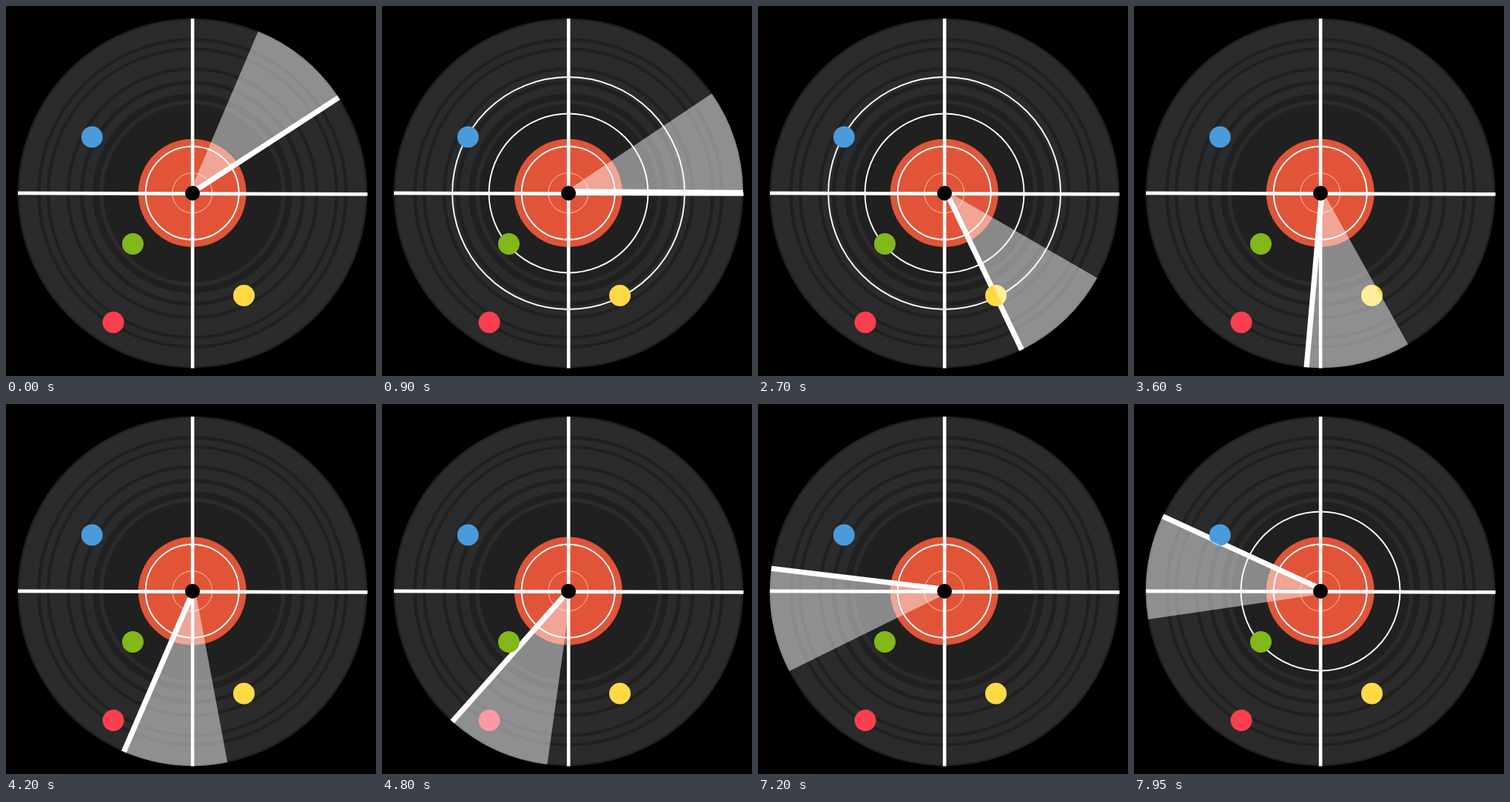
These frames come from a looping animation (500x500 px, 8 s). An HTML page:

```html
<!DOCTYPE html>
<html lang="en">
<head>
<meta charset="utf-8">
<title>Vinyl radar</title>
<style>
  html, body { margin: 0; width: 100%; height: 100%; overflow: hidden; background: #000; }
  svg { display: block; width: 100vw; height: 100vh; }
</style>
</head>
<body>
<svg viewBox="0 0 500 500">
  <g id="disc" fill="none" stroke="#202020"></g>
  <g id="label" fill="none" stroke="#fff"></g>
  <path d="M252.1 17V489.5" stroke="#fff" stroke-width="4.6"/>
  <path d="M16 252.8L488.5 254.4" stroke="#fff" stroke-width="4.8"/>
  <path id="hand" stroke="#fff" stroke-width="7.2"/>
  <g id="dots"></g>
  <path id="wedge" fill="#fff" fill-opacity=".47"/>
  <circle cx="252" cy="253" r="10" fill="#000"/>
</svg>
<script>
const HUB = [252, 253], LABEL = [251.7, 252.7], PIVOT = [254, 250.5];
const R = 236, SWEEP = 34.7, LOOP = 8000, STEP = 150;
const $ = id => document.getElementById(id);

function circle(parent, [cx, cy], r, attrs) {
  const el = document.createElementNS('http://www.w3.org/2000/svg', 'circle');
  const all = { cx, cy, r, ...attrs };
  for (const k in all) el.setAttribute(k, all[k]);
  return $(parent).appendChild(el);
}

// record: body, grooves as radius and width, dark centre
circle('disc', HUB, 235, { fill: '#2b2b2b', 'stroke-width': 2.4 });
for (const [r, w] of [[207.5, 4.4], [195, 4], [168, 4.4], [149.5, 5.6], [130.5, 9]])
  circle('disc', HUB, r, { 'stroke-width': w });
circle('disc', HUB, 120.5, { fill: '#202020', stroke: 'none' });

// two rings stay on the label, the outer three light up in turn
circle('label', LABEL, 73, { fill: '#e15438', stroke: 'none' });
circle('label', LABEL, 27, { 'stroke-width': 0.8, 'stroke-opacity': 0.8 });
circle('label', LABEL, 63, { 'stroke-width': 2 });
const pulse = [107.5, 157, 210].map(r => circle('label', HUB, r, { 'stroke-width': 1.9 }));

const dots = {
  '#4a9bdb': [116.2, 177], '#83b81a': [171.4, 321.4],
  '#fb3f4f': [145, 427.5], '#ffda44': [321.5, 391.2]
};
for (const fill in dots) circle('dots', dots[fill], 14.5, { fill });

// hand angle in degrees, clockwise from the right, by time
const turn = [[0, -33.2], [1800, 32.9], [3600, 94.6], [4800, 131.7], [6000, 158.8], [LOOP, 206.6]];

function angleAt(t) {
  const i = turn.findIndex(([end]) => t < end);
  const [t0, a0] = turn[i - 1], [t1, a1] = turn[i];
  return a0 + (a1 - a0) * (t - t0) / (t1 - t0);
}

function polar([x, y], r, deg) {
  const a = deg * Math.PI / 180;
  return [x + r * Math.cos(a), y + r * Math.sin(a)];
}

function draw(ms) {
  const n = Math.floor(ms / STEP), head = angleAt(n * STEP), tail = head - SWEEP;
  // the wedge meets the hand's rear side; its own rear edge passes 4 px behind the hub
  const front = polar(PIVOT, 3, head - 90), back = polar(HUB, 4, tail - 90);
  $('hand').setAttribute('d', `M${PIVOT}L${polar(HUB, R, head)}`);
  $('wedge').setAttribute('d',
    `M${back}L${polar(HUB, R, tail)}A${R} ${R} 0 0 1 ${polar(HUB, R, head - 0.7)}L${front}Z`);
  pulse.forEach((el, i) => el.setAttribute('visibility', n % 4 > i ? 'visible' : 'hidden'));
}

const start = performance.now();
function tick() {
  draw((performance.now() - start) % LOOP);
  requestAnimationFrame(tick);
}
tick();
</script>
</body>
</html>
```
